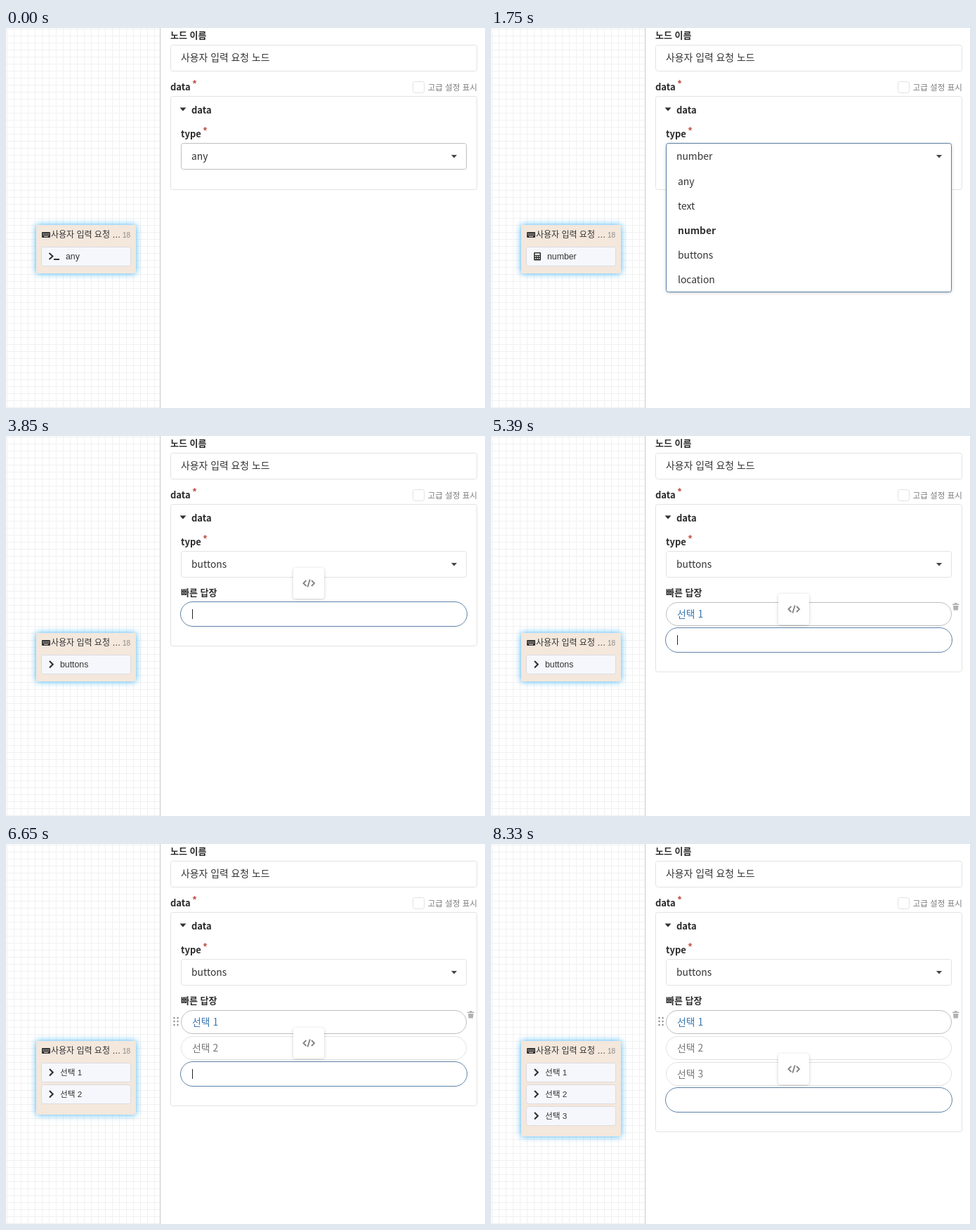
An HTML page that plays this animation: 682x542 px, repeating every 8.61 s.

```html
<!DOCTYPE html>
<html lang="ko">
<head>
<meta charset="utf-8">
<style>
  html, body { margin: 0; width: 100%; height: 100%; overflow: hidden; background: #fff; }
  svg { display: block; }
  text { font: 13.87px "Noto Sans CJK KR", "Noto Sans CJK", sans-serif; white-space: pre; fill: #333; }
  .label { font-size: 13px; font-weight: 700; fill: #2b2b2b; }
  .bold { font-weight: 700; }
  .star { font-weight: 700; fill: #c0564f; }
  .node { font: 12px "Liberation Sans", "Noto Sans CJK KR", "Noto Sans CJK", sans-serif; }
  .glow { filter: drop-shadow(0 0 5px #3fb4f6); }
  .lift { filter: drop-shadow(0 1px 2px #0003); }
  .raised { filter: drop-shadow(0 1px 1px #0002); }
</style>
</head>
<body>
<svg id="stage" width="682" height="542" viewBox="0 0 682 542">
  <defs>
    <pattern id="grid" x="1" y="1" width="10" height="10" patternUnits="userSpaceOnUse">
      <path d="M.5 0V10M0 .5H10" stroke="#f1f1f1" fill="none"/>
    </pattern>
  </defs>
  <rect width="219" height="542" fill="url(#grid)"/>
  <path d="M219.5 0V542" stroke="#cbcbcb"/>
  <g id="scene"></g>
</svg>
<script>
const LOOP = 8610;
const LIGHT = '#e2e2e3', HOVER = '#bdbec0', FOCUS = '#5b81a6', INK = '#2f2f2f';
const OPTIONS = ['any', 'text', 'number', 'buttons', 'location'];

// Each timeline is a list of [start time, value].
const TYPE = [[0, 'any'], [560, 'text'], [1260, 'number'], [1960, 'buttons']];
const MENU = [[0, 0], [70, .35], [140, .75], [280, 1], [2660, 0]];
const ADD_CLICK = 3710;
const ANSWERS = [[0, 0], [5390, 1], [6580, 2], [8260, 3]];
const TOOLBAR = [[0, 0], [3780, .5], [3850, 1]];
const TYPED = [
  [0, ''],
  [4340, '서'], [4410, '선ㅌ'], [4480, '선택'], [4830, '선택 '], [4900, '선택 1'], [5390, ''],
  [5810, '서'], [5880, '선ㅌ'], [5950, '선택'], [6230, '선택 '], [6300, '선택 2'], [6580, ''],
  [7000, '서'], [7070, '선택'], [7350, '선택 '], [7420, '선택 3'], [8260, '']
];
const NODE_DELAY = 70;

const at = (timeline, t) => timeline.findLast(([start]) => start <= t)[1];
const text = (x, y, value, attrs = '') => `<text x="${x}" y="${y}" ${attrs}>${value}</text>`;
const box = (x, y, w, h, r, stroke, attrs = '') =>
  `<rect x="${x}" y="${y}" width="${w}" height="${h}" rx="${r}" stroke="${stroke}" fill="#fff" ${attrs}/>`;
const fill = (d, color) => `<path d="${d}" fill="${color}"/>`;
const line = (d, color, width) => `<path d="${d}" stroke="${color}" stroke-width="${width}" fill="none"/>`;

const ICONS = {
  any: [85, line('M61.5 321l5 4.5-5 4.5', INK, 2) + fill('M68 329h8v2h-8z', INK)],
  text: [80, line('M62 321.5h9M66.5 321v10', INK, 2)],
  number: [80, `<rect x="61" y="320" width="10" height="11.5" rx="1" fill="${INK}"/>` +
    fill('M62.5 321.5h7v2.2h-7zM62.5 325h1.6v1.6h-1.6zM65.2 325h1.6v1.6h-1.6zM67.9 325h1.6v1.6h-1.6z' +
      'M62.5 328h1.6v1.6h-1.6zM65.2 328h1.6v1.6h-1.6zM67.9 328h1.6v1.6h-1.6z', '#fff')],
  buttons: [77, line('M62 321l4.7 4.7-4.7 4.7', INK, 2.1)]
};

function node(type, count) {
  const bottom = count ? 324 + 31 * count : 350;
  const [textX, icon] = ICONS[type];
  let out = `<rect class="glow" x="43" y="281" width="142" height="${bottom - 281}" rx="2" fill="#f4e7dc"/>`;
  out += `<rect x="51" y="291" width="12" height="8" rx="1" fill="${INK}"/>` +
    `<path d="M52.5 293.3h9M52.5 295.2h9" stroke="#f4e7dc" stroke-dasharray="1 1"/>` +
    line('M54 297.3h6', '#f4e7dc', 1);
  out += text(64, 298.5, '사용자 입력 요청 …', 'class="node"');
  out += text(166, 299, '18', 'class="node" style="font-size:10px;fill:#8c8c8c"');
  for (let i = 0; i < (count || 1); i++) {
    out += `<g transform="translate(0 ${31 * i})">` +
      box(50.5, 312.5, 127, 27, 3, '#dddcdf', 'style="fill:#f6f7fc"') + icon +
      text(textX, 330, count ? `선택 ${i + 1}` : type, `class="node" style="font-size:${count ? 11.7 : 12.3}px"`) +
      '</g>';
  }
  return out;
}

function select(t) {
  const type = at(TYPE, t);
  const open = at(MENU, t);
  const content = text(264, 188, type) + fill('M634 181h8l-4 4.5z', '#444');
  if (!open) {
    const raised = t >= 2660 && t < 3430 ? 'class="raised"' : '';
    return box(249.5, 164.5, 406, 37, 3, t < 3430 ? HOVER : LIGHT, raised) + content;
  }
  const options = OPTIONS.map((name, i) =>
    text(266, 224 + 35 * i, name, name === type ? 'class="bold"' : '')).join('');
  return box(249.5, 164.5, 406, 37 + 175 * open, 3, FOCUS, 'class="lift"') + content +
    `<g opacity="${open}" transform="translate(0 ${202 * (1 - open)}) scale(1 ${open})">${options}</g>`;
}

function toolbar(index, opacity) {
  return `<g transform="translate(0 ${37 * index})" opacity="${opacity}">` +
    '<rect class="lift" x="409" y="188" width="44" height="44" rx="4" fill="#fff"/>' +
    line('M427.5 206l-4 4 4 4M435 206l4 4-4 4M432.8 204.5l-3.4 11', '#858585', 1.9) + '</g>';
}

function answers(t) {
  if (at(TYPE, t) !== 'buttons') return '';
  const count = at(ANSWERS, t);
  let out = text(249, 228, '빠른 답장', 'class="label"');
  if (t < ADD_CLICK) {
    return out + box(249.5, 237.5, 406, 35, 17.5, LIGHT) + line('M403 256.5h9M407.5 252v9', '#888', 2) +
      text(417, 259.5, '빠른 답장 추가', 'style="fill:#888"');
  }
  for (let i = 0; i < count; i++) {
    out += box(249.5, 237.5 + 37 * i, 406, 33, 16.5, i ? LIGHT : HOVER) +
      text(265, 259 + 37 * i, `선택 ${i + 1}`, `style="fill:${i ? '#777' : '#3b76b0'}"`);
  }
  if (count) {
    out += fill('M657 239.5h3v-1.5h3.5v1.5h3v1.5h-9.5zM658 242h7.5l-.6 6.5h-6.3z', '#b0b0b0');
  }
  if (count > 1) {
    for (let i = 0; i < 6; i++) {
      out += `<circle cx="${239.5 + 5 * (i % 2)}" cy="${248 + 5 * (i >> 1)}" r="1.2" fill="#888"/>`;
    }
  }
  const shift = 37 * count;
  out += box(248.5, 236.5 + shift, 408, 35, 17.5, FOCUS) +
    text(265, 259 + shift, at(TYPED, t), 'id="typed"');
  if (t < 8330) out += `<rect id="caret" x="265" y="${247 + shift}" width="1" height="14" fill="#222"/>`;
  return out + toolbar(count, at(TOOLBAR, t));
}

function form(t) {
  const bottom = at(TYPE, t) !== 'buttons' ? 230.5 : t < ADD_CLICK ? 301.5 : 299.5 + 37 * at(ANSWERS, t);
  return text(234, 15, '노드 이름', 'class="label"') +
    box(234.5, 24.5, 436, 37, 3, LIGHT) + text(249, 47, '사용자 입력 요청 노드') +
    text(234, 89, 'data', 'class="label"') + text(265, 85, '*', 'class="star"') +
    box(579.5, 76.5, 16, 16, 3, LIGHT) +
    text(671, 89, '고급 설정 표시', 'text-anchor="end" style="font-size:11.6px;font-weight:500;fill:#7c7c7c"') +
    box(234.5, 97.5, 436, bottom - 97.5, 3, LIGHT) +
    fill('M247.5 113.5h9l-4.5 5z', INK) + text(264, 122, 'data', 'class="label"') +
    text(249, 156, 'type', 'class="label"') + text(280, 152, '*', 'class="star"');
}

function render(t) {
  // The open menu covers the answers; later the floating toolbar covers the select.
  const layers = t < ADD_CLICK ? [answers, select] : [select, answers];
  const listed = at(ANSWERS, Math.max(0, t - NODE_DELAY));
  return node(at(TYPE, t), listed) + form(t) + layers.map(draw => draw(t)).join('');
}

const scene = document.getElementById('scene');
let shown = '';
function frame() {
  const markup = render(performance.now() % LOOP);
  if (markup !== shown) {
    scene.innerHTML = shown = markup;
    const caret = document.getElementById('caret');
    const typed = document.getElementById('typed');
    if (caret && typed.textContent) caret.setAttribute('x', Math.round(265.5 + typed.getComputedTextLength()));
  }
  requestAnimationFrame(frame);
}
frame();
</script>
</body>
</html>
```
